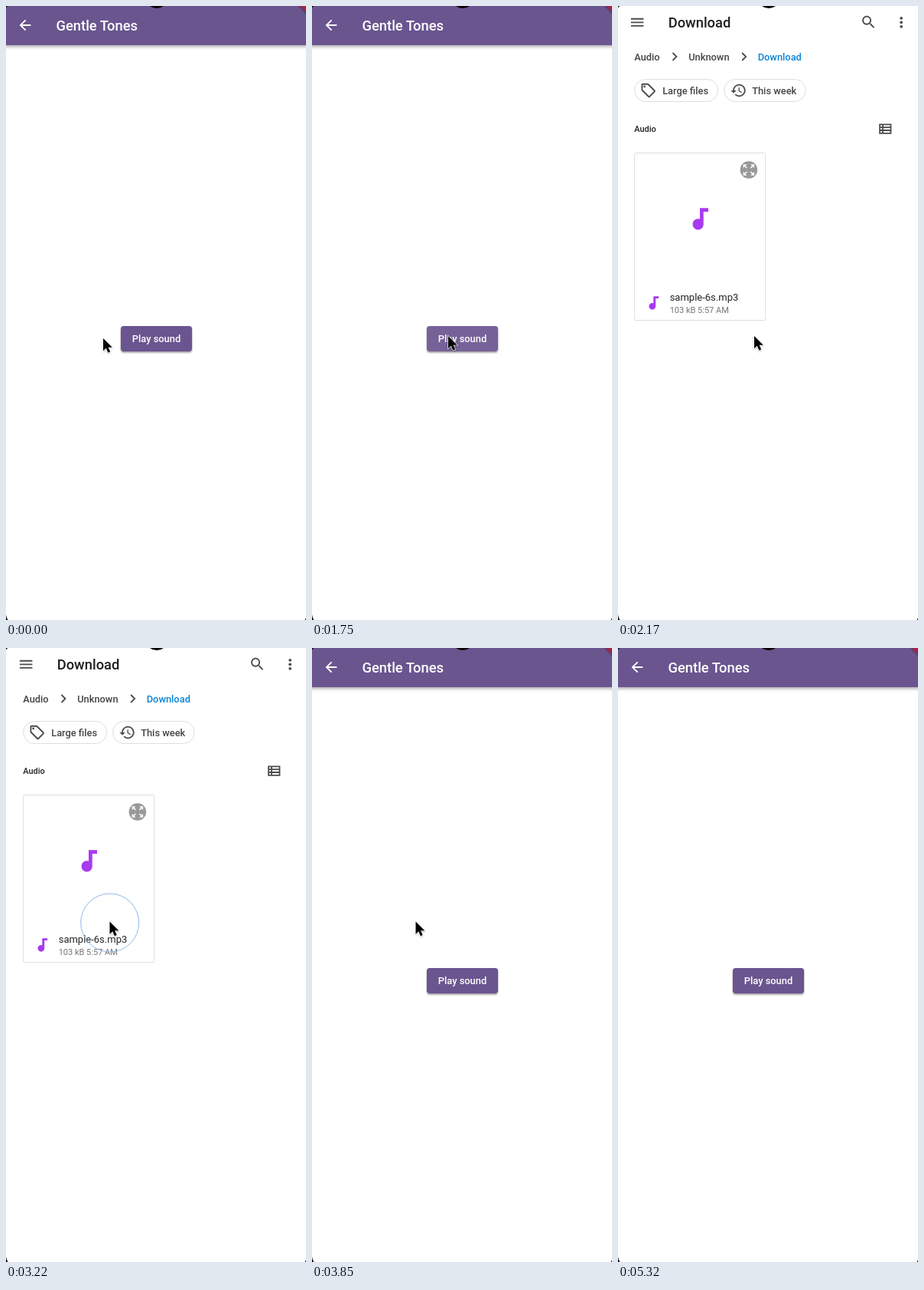
An HTML page that plays this animation: 392x800 px, repeating every 5.6 s.

```html
<!DOCTYPE html>
<html lang="en">
<head>
<meta charset="utf-8">
<title>Audio demo</title>
<style>
html, body { margin: 0; width: 100%; height: 100%; overflow: hidden; background: #fff; }
svg { display: block; width: 100%; height: 100%; font-family: Roboto, sans-serif; }
.m { font-weight: 500; }
.title { font-size: 18.35px; }
.body { font-size: 12.85px; }
.icon { fill: #4c4c4c; }
.line { fill: none; stroke: #4c4c4c; stroke-width: 1.8; }
.edge { fill: none; stroke: #dedede; }
</style>
</head>
<body>
<svg viewBox="0 0 392 800" xmlns="http://www.w3.org/2000/svg">
  <defs>
    <filter id="barShadow" x="-5%" y="-20%" width="110%" height="150%">
      <feDropShadow dx="0" dy="2" stdDeviation="2" flood-opacity=".35"/>
    </filter>
    <filter id="btnShadow" x="-10%" y="-20%" width="120%" height="160%">
      <feDropShadow dx="0" dy="1.6" stdDeviation="1.3" flood-opacity=".42"/>
    </filter>
    <filter id="tipShadow" x="-40%" y="-30%" width="200%" height="180%">
      <feDropShadow dx="0" dy="1" stdDeviation="1" flood-opacity=".3"/>
    </filter>
    <clipPath id="btnClip"><rect x="150" y="417" width="93" height="33" rx="3.7"/></clipPath>
    <path id="note" d="M12 3v9.28c-.47-.17-.97-.28-1.5-.28C8.01 12 6 14.01 6 16.5S8.01 21 10.5 21c2.31 0 4.2-1.75 4.45-4H15V6h4V3z"/>
  </defs>

  <rect width="392" height="800" fill="#fff"/>

  <g id="home">
    <rect x="-60" y="-20" width="520" height="71" fill="#6b548f" filter="url(#barShadow)"/>
    <path d="M381 0H392V11Z" fill="#59335f" opacity=".6"/>
    <path d="M384 0H392V8Z" fill="#a32443"/>
    <path transform="translate(14 14) scale(.917)" fill="#fff" d="M20 11H7.83l5.59-5.59L12 4l-8 8 8 8 1.41-1.41L7.83 13H20z"/>
    <text class="m title" x="65.5" y="32" fill="#fff">Gentle Tones</text>
    <rect x="150" y="417" width="93" height="33" rx="3.7" fill="#6b548f" filter="url(#btnShadow)"/>
    <g clip-path="url(#btnClip)">
      <circle id="splash" cx="178" cy="431" r="0" fill="#fff" opacity=".08"/>
    </g>
    <text class="m body" x="196.5" y="438" text-anchor="middle" fill="#fff">Play sound</text>
  </g>

  <g id="files">
    <rect x="-60" width="520" height="800" fill="#fff"/>
    <path class="icon" transform="translate(14 10.3) scale(.917)" d="M3 18h18v-2H3zM3 13h18v-2H3zM3 8h18V6H3z"/>
    <text class="m title" x="65.5" y="28" fill="#1f1f1f">Download</text>
    <path class="icon" transform="translate(316.2 10) scale(.917)" d="M15.5 14h-.79l-.28-.27C15.41 12.59 16 11.11 16 9.5 16 5.91 13.09 3 9.5 3S3 5.91 3 9.5 5.91 16 9.5 16c1.61 0 3.09-.59 4.23-1.57l.27.28v.79l5 4.99L20.49 19zm-6 0C7.01 14 5 11.99 5 9.5S7.01 5 9.5 5 14 7.01 14 9.5 11.99 14 9.5 14z"/>
    <g class="icon"><circle cx="370" cy="15.8" r="1.9"/><circle cx="370" cy="21.3" r="1.9"/><circle cx="370" cy="26.8" r="1.9"/></g>

    <g class="m body" fill="#454545">
      <text x="21" y="71">Audio</text>
      <text x="92" y="71">Unknown</text>
      <text x="182.5" y="71" fill="#0b84d8">Download</text>
      <text x="58" y="115">Large files</text>
      <text x="175" y="115">This week</text>
    </g>
    <path class="line" d="M71.3 61l5 5-5 5M162 61l5 5-5 5"/>

    <rect class="edge" x="21.5" y="95.5" width="109" height="29" rx="14.5"/>
    <rect class="edge" x="138.5" y="95.5" width="106.5" height="29" rx="14.5"/>
    <g class="icon" transform="translate(28.5 99) scale(.917)">
      <path d="M21.41 11.58l-9-9C12.05 2.22 11.55 2 11 2H4c-1.1 0-2 .9-2 2v7c0 .55.22 1.05.59 1.42l9 9c.36.36.86.58 1.41.58s1.05-.22 1.41-.59l7-7c.37-.36.59-.86.59-1.41s-.23-1.06-.59-1.42zM13 20.01L4 11V4h7l9 9z"/>
      <circle cx="6.5" cy="6.5" r="1.5"/>
    </g>
    <path class="icon" transform="translate(146.3 99) scale(.917)" d="M13 3c-4.97 0-9 4.03-9 9H1l3.89 3.89.07.14L9 12H6c0-3.87 3.13-7 7-7s7 3.13 7 7-3.13 7-7 7c-1.93 0-3.68-.79-4.94-2.06l-1.42 1.42C8.27 19.99 10.51 21 13 21c4.97 0 9-4.03 9-9s-4.03-9-9-9zm-1 5v5l4.28 2.54.72-1.21-3.5-2.08V8z"/>

    <text class="m" x="21" y="164.3" font-size="11" fill="#222">Audio</text>
    <path class="line" stroke-width="1.6" d="M341.9 154.4h14.4v11.4h-14.4zM345.8 154v12M342 158.2h14M342 162h14"/>

    <rect class="edge" x="21.5" y="191.5" width="171" height="218" rx="1.5"/>
    <circle cx="170.7" cy="213.5" r="11.3" fill="#999"/>
    <path transform="translate(161.1 203.9) scale(.8)" fill="#fff" d="M15 3l2.3 2.3-2.89 2.87 1.42 1.42L18.7 6.7 21 9V3zM3 9l2.3-2.3 2.87 2.89 1.42-1.42L6.7 5.3 9 3H3zm6 12l-2.3-2.3 2.89-2.87-1.42-1.42L5.3 17.3 3 15v6zm12-6l-2.3 2.3-2.87-2.89-1.42 1.42 2.89 2.87L15 21h6z"/>
    <g fill="#a83af0">
      <use href="#note" transform="translate(88 258.5) scale(1.57)"/>
      <use href="#note" transform="translate(34.5 375.3) scale(.97)"/>
    </g>
    <text x="67.5" y="384.3" font-size="13" fill="#222">sample-6s.mp3</text>
    <text x="67.5" y="400" font-size="11" fill="#757575">103 kB 5:57 AM</text>
    <circle id="ring" cx="134.5" cy="358" r="0" fill="none" stroke="#8db9ea"/>
  </g>

  <circle cx="197" cy="-12" r="15"/>
  <path d="M0 0H3Q0 .5 0 3.5ZM0 793Q.7 798 2.5 800H0ZM392 797Q391.5 799 390.5 800H392Z"/>
  <path id="cursor" d="M0 0V16.2L3.8 12.7 6.4 18.8 9.2 17.6 6.6 11.7H11.8Z" stroke="#fff" stroke-width="1.2" paint-order="stroke" filter="url(#tipShadow)"/>
</svg>
<script>
const LOOP = 5600, STEP = 70;
const PRESS = 1330, OPEN = 1800, TAP = 3130, CLOSE = 3193;
const SLIDE = 39.2, SLIDE_MS = 450, FADE_MS = 83;

// Cursor legs: start, end, from x, y, to x, y
const legs = [
  [350, 840, 127, 433, 178, 430],
  [2870, 3150, 178, 430, 135.5, 356.5],
  [4130, 4830, 135.5, 356.5, 94, -22]
];

const [home, files, splash, ring, cursor] =
  ['home', 'files', 'splash', 'ring', 'cursor'].map(id => document.getElementById(id));

const part = (t, start, ms) => Math.min(1, Math.max(0, (t - start) / ms));
const smooth = p => p * p * (3 - 2 * p);
const mix = (a, b, p) => a + (b - a) * p;
const bezier = (a, b, c, d, s) => {
  const r = 1 - s;
  return r * r * r * a + 3 * r * r * s * b + 3 * r * s * s * c + s * s * s * d;
};

// Quick start with a very long settle, made of two joined curves
function settle(p) {
  if (p <= 0 || p >= 1) return p <= 0 ? 0 : 1;
  const [xs, ys] = p < 1 / 6
    ? [[0, .05, .13333, 1 / 6], [0, 0, .06, .4]]
    : [[1 / 6, .20833, .25, 1], [.4, .82, 1, 1]];
  let lo = 0, hi = 1;
  for (let i = 0; i < 20; i++) {
    const mid = (lo + hi) / 2;
    if (bezier(...xs, mid) < p) lo = mid; else hi = mid;
  }
  return bezier(...ys, lo);
}

function place(el, x, y = 0) {
  el.setAttribute('transform', `translate(${x.toFixed(2)} ${y.toFixed(2)})`);
}

function draw(t) {
  const opened = settle(part(t, OPEN, SLIDE_MS));
  const closed = settle(part(t, CLOSE, SLIDE_MS));
  place(home, SLIDE * (closed - opened));
  place(files, SLIDE * (1 - opened + closed));
  files.setAttribute('opacity',
    part(t, OPEN + 50, FADE_MS) * (1 - part(t, CLOSE + 35, FADE_MS)));

  splash.setAttribute('r', t < CLOSE ? 75 * smooth(part(t, PRESS, 400)) : 0);
  ring.setAttribute('r', 38 * part(t, TAP, 80));

  let x = legs[0][2], y = legs[0][3];
  for (const [start, end, x0, y0, x1, y1] of legs) {
    if (t < start) break;
    const p = smooth(part(t, start, end - start));
    x = mix(x0, x1, p);
    y = mix(y0, y1, p);
  }
  place(cursor, x, y);
}

function tick() {
  const t = performance.now() % LOOP;
  draw(Math.floor(t / STEP) * STEP);
  requestAnimationFrame(tick);
}
tick();
</script>
</body>
</html>
```
